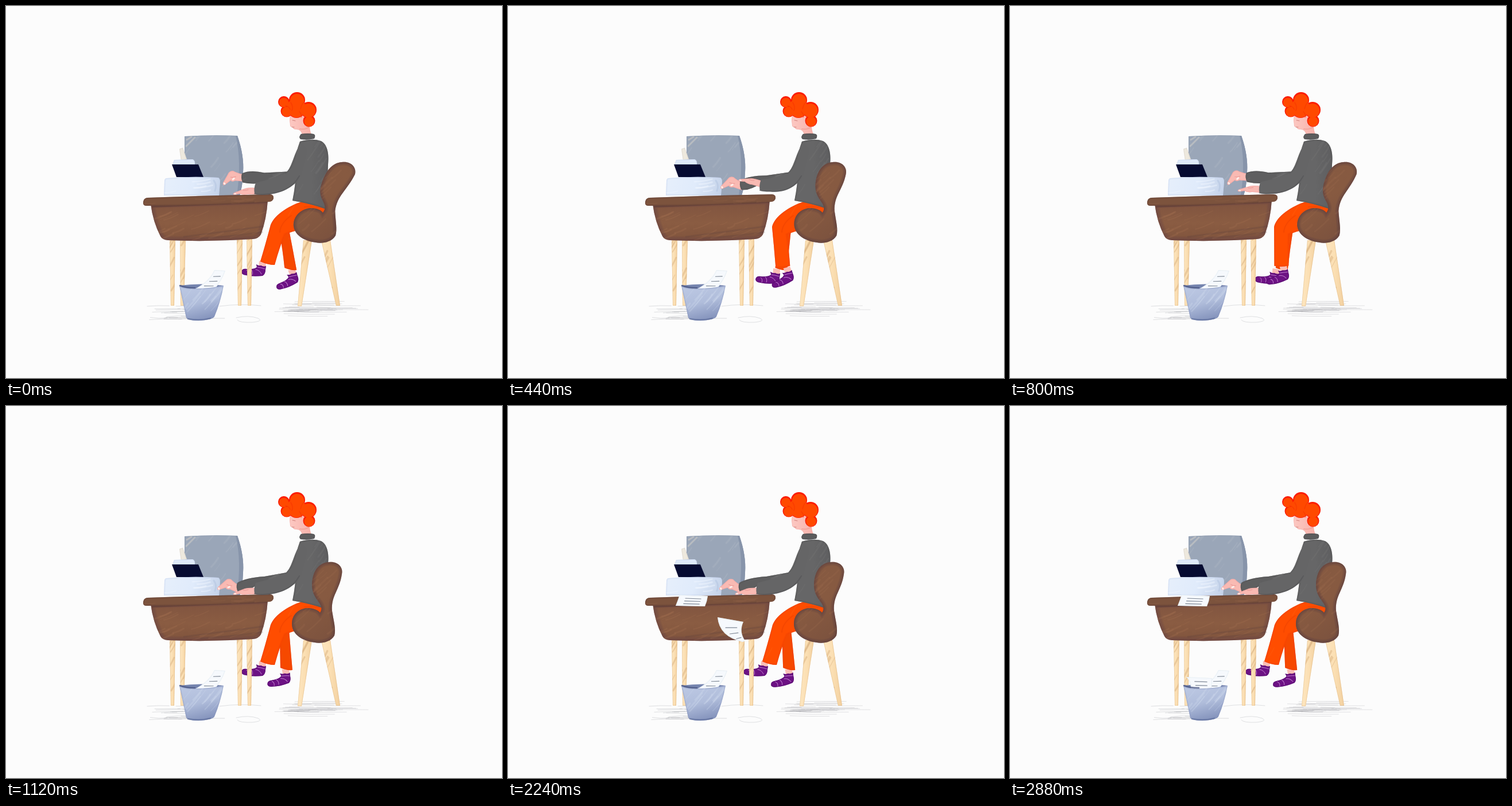
Animation, 864 px wide and 648 px high, one loop 2.96 s. Source, as an HTML page with a canvas:

```html
<!DOCTYPE html>
<html lang="en">
<head>
<meta charset="utf-8">
<title>Writer at a desk</title>
<style>
  html, body { margin: 0; width: 100%; height: 100%; overflow: hidden; background: #fcfcfc; }
  canvas { display: block; width: 864px; height: 648px; }
</style>
</head>
<body>
<canvas id="stage" width="864" height="648"></canvas>
<script>
const ctx = document.getElementById('stage').getContext('2d');
const LOOP = 2960, STEP = 40;
const clamp = (v, lo = 0, hi = 1) => Math.min(hi, Math.max(lo, v));
const mix = (a, b, k) => a + (b - a) * k;
const ease = k => (1 - Math.cos(Math.PI * clamp(k))) / 2;
const shape = d => new Path2D(d);

function seeded(seed) {
  return () => {
    seed = (seed * 16807) % 2147483647;
    return seed / 2147483647;
  };
}

function line(d, color, width = 1, alpha = 1) {
  ctx.save();
  ctx.globalAlpha = alpha;
  ctx.strokeStyle = color;
  ctx.lineWidth = width;
  ctx.lineCap = 'round';
  ctx.stroke(typeof d === 'string' ? shape(d) : d);
  ctx.restore();
}

// Fill a path, then soften its rim and brush strokes inside it.
function paint(path, fill, { edge, rim = 5, brush, box, slope = -0.6, count = 14, alpha = 0.2, seed = 7 } = {}) {
  if (typeof path === 'string') path = shape(path);
  ctx.save();
  ctx.fillStyle = fill;
  ctx.fill(path);
  ctx.clip(path);
  if (edge) for (const k of [3, 2.2, 1.4, 0.7]) line(path, edge, rim * k, 0.15);
  if (brush) {
    const rnd = seeded(seed), [x, y, w, h] = box;
    for (let i = 0; i < count; i++) {
      const px = x + rnd() * w, py = y + rnd() * h, len = 12 + rnd() * 28;
      const dx = len / Math.hypot(1, slope);
      line(`M${px} ${py}q${dx / 2} ${dx * slope / 2 + 2} ${dx} ${dx * slope}`, brush, 1 + rnd() * 2.5, alpha);
    }
  }
  ctx.restore();
}

function gradient(x0, y0, x1, y1, ...colors) {
  const g = ctx.createLinearGradient(x0, y0, x1, y1);
  colors.forEach((c, i) => g.addColorStop(i / (colors.length - 1), c));
  return g;
}

function floor() {
  const scribble = (x, y, w, h, n, seed, alpha) => {
    const rnd = seeded(seed);
    for (let i = 0; i < n; i++) {
      const px = x + rnd() * w * 0.6, py = y + rnd() * h, len = w * (0.2 + rnd() * 0.35);
      const bow = rnd() * 6 - 3;
      line(`M${px} ${py}q${len / 2} ${bow} ${len} ${bow / 2}`, '#9a9ca2', 0.7, alpha);
    }
  };
  scribble(246, 521, 110, 26, 15, 31, 0.45);
  scribble(275, 542, 105, 6, 6, 12, 0.5);
  scribble(468, 514, 165, 28, 24, 5, 0.4);
  scribble(482, 525, 110, 7, 9, 77, 0.5);
  line('M401 543q22-5 38 1q10 5-10 7q-22 1-26-4M372 523q36-5 72-1', '#b5b7bc', 0.7, 0.6);
}

function woodLeg(x0, x1, y0, b0, b1, y1) {
  const d = `M${x0} ${y0}L${x1} ${y0}L${b1} ${y1}L${b0} ${y1}Z`;
  paint(d, gradient(Math.min(x0, b0), 0, Math.max(x1, b1), 0, '#fde6c0', '#fbdfb3', '#f2d0a0'), {
    edge: '#d6ae7c', rim: 0.8, brush: '#cfa673', box: [Math.min(x0, b0) - 8, y0, 14, y1 - y0],
    slope: -1.8, count: 7, alpha: 0.4, seed: 40 + x0 });
}

function monitor() {
  paint('M311 227Q358 224 403 226Q415 260 413 290Q412 315 407 330L311 330Z', '#9aa6b8', {
    edge: '#8995a9', rim: 1, brush: '#b3bbc7', box: [308, 225, 92, 95], slope: -1.3, count: 14, alpha: 0.25, seed: 3 });
  paint('M403 226Q415 260 413 290Q412 315 407 330L402 330Q411 270 400 226Z', '#8794aa');
  line('M315 233l8-5M314 244l15-15', '#d5d2ca', 3, 0.5);
}

function printer() {
  paint('M302 249L308 247L315 267L305 269Z', '#eee9de', { edge: '#cfcac0', rim: 1 });
  paint('M293 268L325 267Q330 269 329 276L290 276Z', '#dfeafa', { edge: '#c2d1e8', rim: 1 });
  paint('M289 276L335 276L344 298L297 298Z', '#060b31');
  paint('M279 300Q324 296 370 299Q373 301 373 306L371 330L275 330L276 305Q276 301 279 300Z',
    gradient(276, 300, 373, 330, '#e6effb', '#e0ebfb', '#c3d1e8'), {
    edge: '#bfcee6', rim: 1.5, brush: '#f3f8ff', box: [276, 305, 70, 22], slope: -0.15, count: 6, alpha: 0.4 });
  line('M362 304q6 8 2 18', '#a6b9db', 3, 0.35);
}

function desk() {
  paint('M252 345L456 338Q454 371 444 398Q440 405 430 406Q355 411 282 408Q272 407 269 401Q256 376 252 345Z',
    gradient(0, 345, 0, 410, '#815540', '#8a5c42', '#80543d'), {
    edge: '#5d4142', rim: 5, brush: '#a3714f', box: [255, 360, 180, 50], slope: -0.4, count: 24, alpha: 0.25, seed: 17 });
  paint('M254 346L456 338L455 343L255 351Z', 'rgba(70,45,48,.35)');
  line('M310 402Q390 392 447 384M340 405Q410 399 446 394', '#593c3c', 3, 0.22);
  paint('M246 334Q350 330 460 328Q467 329 466 335Q465 340 459 341Q350 348 244 348Q238 348 239 341Q240 335 246 334Z',
    '#7c533d', { edge: '#5c4039', rim: 1.5, brush: '#946447', box: [240, 333, 210, 12], slope: -0.04, count: 12, alpha: 0.25 });
}

function sock(x, y, degrees) {
  ctx.save();
  ctx.translate(x, y);
  ctx.rotate(degrees * Math.PI / 180);
  paint('M-6-10L6-8L5 4L-7 2Z', '#f9bdb5');
  paint('M-11-4Q-7-1-3-2Q2 1 6-1L5 5Q5 13 0 16Q-17 18-29 15Q-37 14-37 9Q-36 3-28 4Q-15 5-10 1Z',
    '#6d1284', { edge: '#480a5c', rim: 1 });
  line('M-9 1Q-2 2 4 4M-12 5Q-5 6-2 13M-20 5Q-16 9-18 14M-28 6Q-24 9-26 14', '#d59ae0', 1, 0.8);
  ctx.restore();
}

function trouser(x, y, tilt, fill, front) {
  const w = 13, left = `${x - w} ${y - tilt}`, right = `${x + w - 1} ${y + tilt}`;
  const d = front
    ? `M556 340L515 341C492 348 464 366 460 385Q${mix(460, x - w, .55)} 420 ${left}Q${x} ${y + 3} ${right}Q${mix(485, x + w, .5)} 418 486 398Q500 392 512 390L558 362Z`
    : `M500 380L476 392Q${mix(476, x - 10, .6)} 425 ${x - 11} ${y - tilt}Q${x} ${y + 3} ${x + 10} ${y + tilt}Q${mix(492, x + 10, .55)} 425 493 390Z`;
  paint(d, fill, { edge: '#ea3d00', rim: 1.8, brush: '#ff6a1c', box: [450, 360, 60, 85], slope: -1.7, count: 7, alpha: 0.2 });
}

function legs(t) {
  const front = t < 580 ? ease(t / 580) : t < 1120 ? 1 - ease((t - 580) / 540) : 0;
  const backX = t < 650 ? mix(501, 458, ease(t / 650)) : mix(458, 491, ease((t - 650) / 560));
  const backTurn = -25 * clamp((backX - 474) / 26);
  sock(backX, 467, backTurn);
  trouser(mix(489, backX, 0.6), 458, 2, '#f64900', false);
  sock(mix(447, 496, front), mix(454, 465, front), -30 * front);
  trouser(mix(456, 483, front), mix(448, 455, front), mix(3, -2, front), '#ff4d00', true);
  line('M497 365Q478 378 477 394M520 350Q535 349 545 351', '#dd3800', 2, 0.3);
}

function head() {
  paint('M495 188L494 200Q495 205 495 209Q496 211 499 211Q500 215 506 215Q514 215 516 224L532 224Q528 214 529 204L524 188Z',
    gradient(494, 0, 532, 0, '#fcc8c2', '#f8b2ab'), { edge: '#f09a96', rim: 0.7 });
  line('M499 199l5 1M498 211l4 0', '#b2544f', 1, 0.6);
  line('M512 214Q521 216 527 211', '#e88880', 2, 0.4);
  const curls = [[484, 167, 10], [489, 183, 10.5], [528, 200, 10.5], [527, 181, 14], [507, 164, 14], [506, 179, 16]];
  const blobs = (inset, color) => {
    ctx.fillStyle = color;
    for (const [x, y, r] of curls) {
      ctx.beginPath();
      ctx.arc(x, y + inset * 0.6, r - inset, 0, 7);
      ctx.fill();
    }
  };
  blobs(0, '#fb1c00');
  blobs(1.8, '#ff4900');
  ctx.beginPath();
  ctx.ellipse(507, 177, 18, 13, 0.3, 0, 7);
  ctx.fill();
  line('M496 168q5 8 2 14M517 169q-3 6-4 10M511 184q6 7 3 10M487 174q6 1 8 6', '#f53000', 1.5, 0.5);
}

function hand(x, y, degrees, pinched) {
  ctx.save();
  ctx.translate(x, y);
  ctx.rotate(degrees * Math.PI / 180);
  const d = pinched
    ? 'M3-6Q-9-8-17-12Q-24-12-26-6L-34 9Q-35 14-31 13L-21 5Q-18 8-13 5L3 6Z'
    : 'M3-5Q-11-6-18-4L-36 3Q-41 6-36 7L-27 5Q-21 8-13 6L3 6Z';
  paint(d, '#f9bab3', { edge: '#ed9797', rim: 1 });
  line(pinched ? 'M-15 1l-2 2M-32 10l1 1' : 'M-36 5l2 0', '#fff4ef', pinched ? 3 : 2, 0.9);
  line('M-12-2q-5 2-9 1', '#dd7778', 1, 0.5);
  ctx.restore();
}

const WOOL = { edge: '#505052', rim: 1.8, brush: '#777778', slope: -0.5, count: 9, alpha: 0.25 };

function farArm(lift) {
  const x = mix(403, 412, lift), y = mix(315, 297, lift);
  hand(x + 1, y + mix(4, 1, lift), mix(20, 0, lift), true);
  paint(`M${x} ${y - 7}Q${x + 15} ${y - mix(16, 13, lift)} 450 ${mix(297, 290, lift)}L500 288L495 305L440 309Q${x + 15} ${y + 12} ${x + 1} ${y + 9}Q${x - 3} ${y} ${x} ${y - 7}Z`,
    '#5f5f60', { ...WOOL, box: [400, 290, 80, 20] });
}

function nearArm(lift) {
  const x = mix(432, 438, lift), y = mix(318, 312, lift);
  hand(x + 2, mix(322, 309, lift), mix(0, 18, lift), false);
  paint(`M514 238C501 256 499 281 487 291Q468 300 ${x + 3} ${y - 10}Q${x - 1} ${y} ${x + 1} ${y + 9}Q${x + 7} ${y + 11} ${x + 18} ${y + 11}C486 327 505 311 514 296L525 250Z`,
    '#656566');
  line(`M${x + 1} ${y + 9}Q${x + 7} ${y + 11} ${x + 18} ${y + 10}C486 326 503 311 511 296`, '#505052', 2, 0.5);
  line('M505 258Q500 282 487 292', '#575758', 2, 0.4);
}

function torso() {
  paint('M512 236Q534 230 548 235C560 240 563 258 561 276L558 354Q530 344 499 339Q505 310 505 285Q504 255 512 236Z',
    gradient(500, 0, 562, 0, '#666667', '#666667', '#5e5e60'), { ...WOOL, box: [506, 240, 46, 95], slope: -1.5, count: 14 });
  paint('M514 223Q526 221 536 223Q540 225 537 231Q525 234 513 232Q509 228 514 223Z', '#5c5c5d', { edge: '#48484a', rim: 1 });
}

// The chair back bends progressively with height; the seat barely moves.
function chair(t) {
  const lean = t < 1050 ? (1 + Math.cos(2 * Math.PI * t / 700)) / 2 : 0;
  woodLeg(518, 533, 408, 508, 515, 523);
  woodLeg(549, 565, 408, 575, 582, 522);
  const bend = (x, y) => [x + lean * (2 + 21 * clamp((405 - y) / 112) ** 2.2), y];
  const curves = [
    [546, 340, 533, 332, 533, 311], [534, 286, 546, 273, 562, 272], [578, 270, 588, 281, 585, 293],
    [581, 321, 566, 330, 568, 357], [571, 376, 575, 389, 572, 400], [565, 412, 548, 414, 538, 412],
    [513, 409, 497, 395, 498, 378], [499, 358, 517, 351, 528, 352], [538, 353, 544, 356, 547, 360],
    [550, 356, 550, 351, 548, 347]];
  const body = new Path2D();
  body.moveTo(...bend(548, 347));
  for (const [a, b, c, d, e, f] of curves) body.bezierCurveTo(...bend(a, b), ...bend(c, d), ...bend(e, f));
  paint(body, gradient(500, 280, 590, 400, '#855941', '#875a41', '#7a513e'), {
    edge: '#553b40', rim: 4, brush: '#a07050', box: [502 + lean * 8, 288, 65, 112], slope: -0.9, count: 18, alpha: 0.2, seed: 29 });
}

// Sheet points: top left, top right, right bend, bottom right, bottom left, left bend.
const STUB = [299, 329, 348, 331, 347, 340, 343, 349, 292, 348, 296, 338];
const FALL = [
  [1800, STUB],
  [1920, [305, 329, 350, 330, 328, 355, 358, 375, 351, 384, 312, 375]],
  [2240, [365, 368, 410, 376, 402, 393, 413, 409, 409, 411, 368, 402]],
  [2320, [370, 384, 412, 396, 400, 410, 408, 425, 404, 427, 366, 410]],
  [2560, [330, 425, 375, 420, 385, 440, 368, 462, 328, 460, 320, 440]],
  [2760, [307, 472, 352, 474, 352, 485, 350, 500, 314, 500, 318, 484]]];

function sheet(p) {
  const [ax, ay, bx, by, rx, ry, cx, cy, dx, dy, lx, ly] = p;
  paint(`M${ax} ${ay}L${bx} ${by}Q${rx} ${ry} ${cx} ${cy}L${dx} ${dy}Q${lx} ${ly} ${ax} ${ay}Z`,
    '#f6f9fd', { edge: '#d7e0ec', rim: 1 });
  const quad = (a, b, c, u) => (1 - u) ** 2 * a + 2 * u * (1 - u) * b + u * u * c;
  for (const u of [0.3, 0.55, 0.8]) {
    const x0 = quad(ax, lx, dx, u), y0 = quad(ay, ly, dy, u);
    const x1 = quad(bx, rx, cx, u), y1 = quad(by, ry, cy, u);
    line(`M${mix(x0, x1, .24)} ${mix(y0, y1, .24)}L${mix(x0, x1, .78)} ${mix(y0, y1, .78)}`, '#626b7b', 1.1, 0.8);
  }
}

function stub(t) {
  if (t < 1160) return;
  ctx.save();
  ctx.beginPath();
  ctx.rect(280, 329, 90, 40);
  ctx.clip();
  ctx.translate(0, -21 * (1 - ease((t - 1120) / 520)));
  sheet(STUB);
  ctx.restore();
}

function fallingSheet(t) {
  if (t < 1800) return;
  const next = FALL.findIndex(([time]) => time > t);
  if (next < 0) return sheet(FALL[FALL.length - 1][1]);
  const [t0, from] = FALL[next - 1], [t1, to] = FALL[next];
  sheet(from.map((v, i) => mix(v, to[i], (t - t0) / (t1 - t0))));
}

function bin(t) {
  paint('M302 487Q339 482 379 487L375 492Q340 496 305 492Z', '#7584ae');
  sheet([363, 460, 382, 461, 377, 477, 362, 495, 329, 493, 354, 480]);
  fallingSheet(t);
  paint('M302 487Q306 491 322 492Q354 493 379 487Q374 515 363 541Q359 547 335 548Q317 548 314 543Q308 515 302 487Z',
    gradient(320, 488, 335, 549, '#bcc8e3', '#b0bddb', '#8493bc'), {
    edge: '#8796bd', rim: 1.3, brush: '#d0daec', box: [304, 500, 60, 40], slope: -1.2, count: 14, alpha: 0.28, seed: 52 });
  line('M303 487Q313 491 329 491', '#4c5985', 2.5, 0.8);
  line('M317 545Q338 549 356 544', '#53638f', 2.5, 0.5);
}

function draw(t) {
  ctx.fillStyle = '#fcfcfc';
  ctx.fillRect(0, 0, 864, 648);
  floor();
  legs(t);
  woodLeg(303, 313, 405, 304, 310, 522);
  woodLeg(402, 412, 405, 404, 410, 522);
  woodLeg(285, 295, 405, 287, 293, 522);
  woodLeg(419, 429, 405, 421, 427, 522);
  monitor();
  printer();
  desk();
  stub(t);

  const typing = clamp((1120 - t) / 100);
  const beat = shift => (1 + Math.cos(2 * Math.PI * (t - shift) / 280)) / 2 * typing;
  farArm(beat(255));
  head();
  torso();
  nearArm(beat(145));
  chair(t);
  bin(t);
}

function tick(now) {
  draw(Math.min(2880, Math.floor(now % LOOP / STEP) * STEP));
  requestAnimationFrame(tick);
}
draw(0);
requestAnimationFrame(tick);
</script>
</body>
</html>
```
